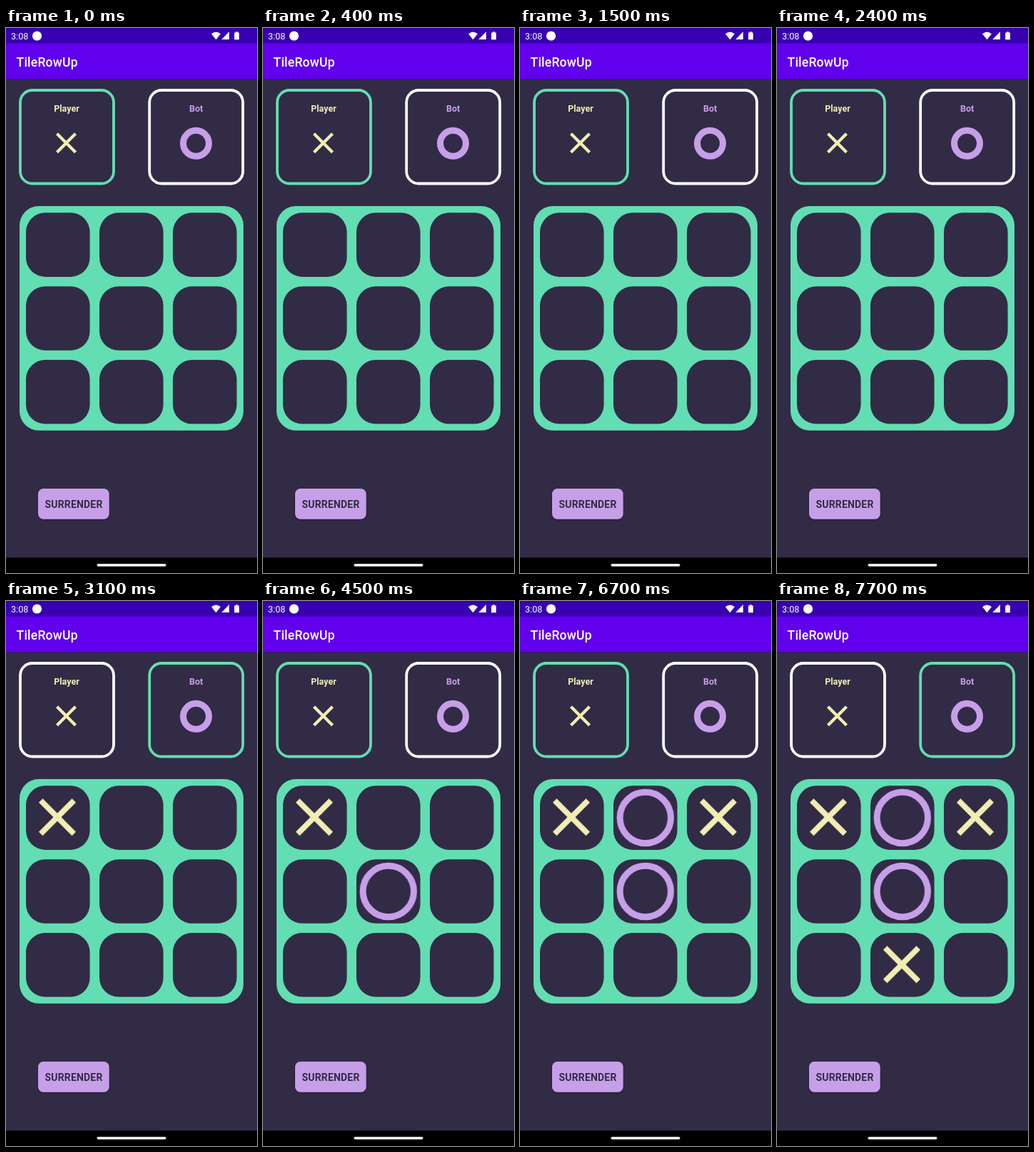
An HTML page for the animation above (8 s loop, 352 by 762 pixels).

```html
<!DOCTYPE html>
<html lang="en">
<head>
<meta charset="utf-8">
<title>Board game</title>
<style>
  :root { --bg: #322b46; --mint: #62deb2; --lilac: #c79fe8; --cream: #f2eeb2; }
  html, body { margin: 0; width: 100%; height: 100%; overflow: hidden; background: var(--bg); }
  svg { display: block; width: 352px; height: 762px; font-family: Roboto, sans-serif; }

  .card { fill: none; stroke-width: 3.8; }
  .cross { fill: none; stroke: var(--cream); }
  .ring { fill: none; stroke: var(--lilac); }
  .name { font-size: 12.5px; font-weight: 700; text-anchor: middle; }
  .button { fill: var(--lilac); filter: drop-shadow(0 1.5px 1.2px rgba(0, 0, 0, .35)); }

  .card, .move { animation: 8s step-end infinite; }
  .player { animation-name: player-turn; }
  .bot { animation-name: bot-turn; }
  .m1 { animation-name: move1; }
  .m2 { animation-name: move2; }
  .m3 { animation-name: move3; }
  .m4 { animation-name: move4; }
  .m5 { animation-name: move5; }

  /* The active side has the mint border. */
  @keyframes player-turn {
    0%, 56.25%, 83.75% { stroke: #62deb2; }
    37.5%, 70%, 95%, 100% { stroke: #fff; }
  }
  @keyframes bot-turn {
    0%, 56.25%, 83.75% { stroke: #fff; }
    37.5%, 70%, 95%, 100% { stroke: #62deb2; }
  }
  @keyframes move1 { 0% { opacity: 0; } 37.5%, 100% { opacity: 1; } }
  @keyframes move2 { 0% { opacity: 0; } 56.25%, 100% { opacity: 1; } }
  @keyframes move3 { 0% { opacity: 0; } 70%, 100% { opacity: 1; } }
  @keyframes move4 { 0% { opacity: 0; } 83.75%, 100% { opacity: 1; } }
  @keyframes move5 { 0% { opacity: 0; } 95%, 100% { opacity: 1; } }
</style>
</head>
<body>
<svg viewBox="0 0 352 762">
  <defs>
    <linearGradient id="shade" x2="0" y2="1">
      <stop stop-opacity=".2"/>
      <stop offset="1" stop-opacity="0"/>
    </linearGradient>
    <rect id="cell" width="89.6" height="89.6" rx="27"/>
    <g id="row">
      <use href="#cell" x="28"/>
      <use href="#cell" x="131"/>
      <use href="#cell" x="234"/>
    </g>
    <path id="cross" class="cross" stroke-width="7.8" d="M-23.3-23.3 23.3 23.3M23.3-23.3-23.3 23.3"/>
    <circle id="ring" class="ring" r="35.7" stroke-width="9"/>
  </defs>

  <rect width="352" height="762" fill="#322b46"/>

  <!-- Status and title bars -->
  <rect y="71" width="352" height="3" fill="url(#shade)"/>
  <rect width="352" height="71.5" fill="#6000ec"/>
  <rect width="352" height="21.5" fill="#3700b1"/>
  <g fill="#fff">
    <text x="7" y="15.6" font-size="12.6">3:08</text>
    <circle cx="43.5" cy="11" r="6.6"/>
    <path d="M288 8.3Q294.5 2.6 301 8.3L294.5 16.2ZM313 5V16H302.3ZM320.2 6.4H322V5.2H325.2V6.4H327V16.2H320.2Z"/>
    <text x="14.5" y="53.8" font-size="17.6" font-weight="500" letter-spacing=".2">TileRowUp</text>
  </g>

  <!-- Player cards -->
  <rect class="card player" x="20" y="87" width="131" height="130.5" rx="17"/>
  <text class="name" x="85" y="116.5" fill="#f2eeb2">Player</text>
  <path class="cross" stroke-width="4.3" transform="translate(84.5 160.8)" d="M-13-13 13 13M13-13-13 13"/>
  <rect class="card bot" x="201.2" y="87" width="131" height="130.5" rx="17"/>
  <text class="name" x="266.6" y="116.5" fill="#c79fe8">Bot</text>
  <circle class="ring" cx="266.5" cy="161.3" r="18" stroke-width="9"/>

  <!-- Board -->
  <rect x="19" y="249" width="314" height="313.7" rx="27" fill="#62deb2"/>
  <g fill="#322b46">
    <use href="#row" y="258.3"/>
    <use href="#row" y="361.2"/>
    <use href="#row" y="464"/>
  </g>
  <use class="move m1" href="#cross" x="72" y="302.2"/>
  <use class="move m2" href="#ring" x="175.8" y="406"/>
  <use class="move m3" href="#cross" x="278" y="302.2"/>
  <use class="move m4" href="#ring" x="175.8" y="303"/>
  <use class="move m5" href="#cross" x="175" y="508.2"/>

  <rect class="button" x="45" y="644" width="99.7" height="42.7" rx="7.5"/>
  <text x="95" y="671" font-size="14" font-weight="700" letter-spacing=".2" text-anchor="middle" fill="#322b46">SURRENDER</text>

  <!-- Navigation bar -->
  <rect y="740.5" width="352" height="21.5"/>
  <rect x="127.5" y="749.2" width="97" height="3.6" rx="1.8" fill="#fff"/>
</svg>
</body>
</html>
```
